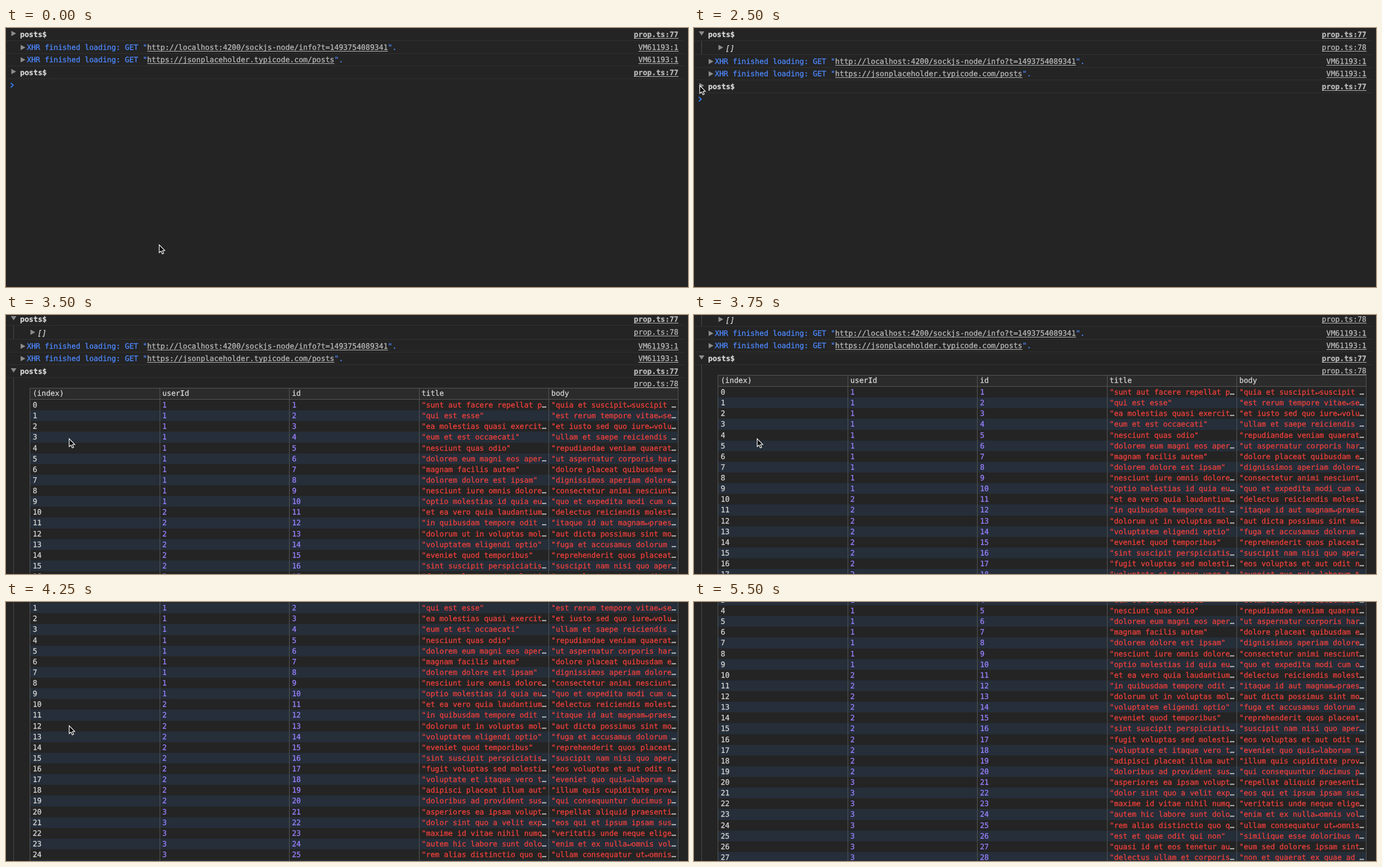
An HTML page with a canvas for the animation above (7500 ms loop, 1212x462 px).

```html
<!DOCTYPE html>
<html lang="en">
<head>
<meta charset="utf-8">
<title>Console</title>
<style>
html, body { margin: 0; width: 100%; height: 100%; overflow: hidden; background: #242424; }
canvas { display: block; }
</style>
</head>
<body>
<canvas id="stage" width="1212" height="462"></canvas>
<script>
const W = 1212, H = 462, LOOP = 7500, STEP = 250;
const ctx = document.getElementById('stage').getContext('2d');

const FONT = '13.17px "DejaVu Sans Mono", monospace';
const BG = '#242424', TEXT = '#d5d5d5', LINK = '#bababa', BLUE = '#4d88ff',
  RED = '#f0403c', PURPLE = '#9980ff', GREY = '#8c8c8c', RULE = '#303030',
  LINE = '#565656', STRIPE = '#252e39', HEAD = '#2b2b2b';

const LEFT = 42.4, COL = 230.4, RIGHT = 1195, TOP = 134, FIRST = 155, ROW = 19.13;
const FIT = 28; // characters that fit in one cell

const ROWS = `sunt aut facere repellat provident|quia et suscipit↵suscipit recusandae
qui est esse|est rerum tempore vitae↵sequi sint
ea molestias quasi exercitationem|et iusto sed quo iure↵voluptatem
eum et est occaecati|ullam et saepe reiciendis voluptatem
nesciunt quas odio|repudiandae veniam quaerat sunt
dolorem eum magni eos aperiam|ut aspernatur corporis harum
magnam facilis autem|dolore placeat quibusdam ea quo
dolorem dolore est ipsam|dignissimos aperiam dolorem qui
nesciunt iure omnis dolorem|consectetur animi nesciunt iure
optio molestias id quia eum|quo et expedita modi cum officia
et ea vero quia laudantium autem|delectus reiciendis molestiae
in quibusdam tempore odit est|itaque id aut magnam↵praesentium
dolorum ut in voluptas mollitia|aut dicta possimus sint mollitia
voluptatem eligendi optio|fuga et accusamus dolorum perferendis
eveniet quod temporibus|reprehenderit quos placeat↵velit
sint suscipit perspiciatis velit|suscipit nam nisi quo aperiam
fugit voluptas sed molestias|eos voluptas et aut odit natus
voluptate et itaque vero tempora|eveniet quo quis↵laborum totam
adipisci placeat illum aut|illum quis cupiditate provident
doloribus ad provident suscipit|qui consequuntur ducimus possimus
asperiores ea ipsam voluptatibus|repellat aliquid praesentium
dolor sint quo a velit explicabo|eos qui et ipsum ipsam suscipit
maxime id vitae nihil numquam|veritatis unde neque eligendi
autem hic labore sunt dolores|enim et ex nulla↵omnis voluptas
rem alias distinctio quo quis|ullam consequatur ut↵omnis quis
est et quae odit qui non|similique esse doloribus nihil
quasi id et eos tenetur aut|eum sed dolores ipsam sint possimus
delectus ullam et corporis nulla|non et quaerat ex quae ad maiores`
  .split('\n').map(line => line.split('|'));

// Pointer stops: [start ms, x, y]
const POINTER = [
  [0, 272, 386], [250, 191, 346], [500, 68, 148], [750, 15, 91], [1000, 11, 15],
  [1250, 10, 14], [1750, 10, 75], [2000, 10, 95], [2250, 10, 102],
  [3000, 20, 111], [3250, 112, 220], [4750, 626, 59], [5000, -50, -50]
];
const SCROLL = [[0, 0], [3500, 4], [3750, 27], [4000, 98], [4250, 173], [4500, 225.5]];

const at = (stops, t) => stops.filter(s => s[0] <= t).pop();

let scroll = 0;

function rect(x, y, w, h, color) {
  const top = Math.round(y - scroll);
  ctx.fillStyle = color;
  ctx.fillRect(Math.round(x), top, w, Math.round(y + h - scroll) - top);
}

// A hairline outline gives the text its slightly heavy smoothing.
function text(str, x, y, color, style = '') {
  ctx.font = style + ' ' + FONT;
  ctx.fillStyle = ctx.strokeStyle = color;
  ctx.lineWidth = 0.3;
  ctx.fillText(str, x, y - scroll);
  ctx.strokeText(str, x, y - scroll);
  return x + ctx.measureText(str).width;
}

function link(str, x, y, style) {
  const end = text(str, x, y, LINK, style);
  rect(x, y + 2, end - x, 1, LINK);
  return end;
}

function source(str, y, style = '') {
  ctx.font = style + ' ' + FONT;
  link(str, RIGHT - ctx.measureText(str).width, y, style);
}

function shape(points, x, y) {
  ctx.beginPath();
  points.forEach(([px, py]) => ctx.lineTo(x + px, y + py));
  ctx.closePath();
}

function arrow(x, y, open) {
  shape(open ? [[-1, 1], [9, 1], [4, 8.5]] : [[0, 0], [8.5, 4.7], [0, 9.4]], x, y - scroll);
  ctx.fillStyle = GREY;
  ctx.fill();
}

const rule = y => rect(0, y, 1206, 1, RULE);

function group(y, open) {
  arrow(9.5, y + 5, open);
  text('posts$', 25, y + 16, TEXT, 'bold');
  source('prop.ts:77', y + 16, 'bold');
  rule(y + 22);
}

function request(url, y) {
  arrow(26, y + 7, false);
  let x = text('XHR finished loading: GET "', 37, y + 16, BLUE);
  x = link(url, x, y + 16);
  text('".', x, y + 16, BLUE);
  source('VM61193:1', y + 16);
  rule(y + 22);
}

function prompt(y) {
  ctx.strokeStyle = '#367cf1';
  ctx.lineWidth = 1.8;
  ctx.beginPath();
  ctx.moveTo(8.5, y + 8 - scroll);
  ctx.lineTo(12.8, y + 12 - scroll);
  ctx.lineTo(8.5, y + 16 - scroll);
  ctx.stroke();
}

function cell(str, x, y) {
  const full = '"' + str + '"';
  if (full.length <= FIT) return text(full, x, y, RED);
  text('…', text(full.slice(0, FIT - 1), x, y, RED), y, TEXT);
}

function table() {
  const width = RIGHT - Math.round(LEFT);
  const inset = i => LEFT + i * COL + 5;
  rect(LEFT, TOP, width, FIRST - TOP, HEAD);
  ['(index)', 'userId', 'id', 'title', 'body'].forEach((name, i) =>
    text(name, inset(i), 148, TEXT));
  ROWS.forEach(([title, body], i) => {
    const y = FIRST + i * ROW, base = y + 14;
    if (i % 2) rect(LEFT, y, width, ROW, STRIPE);
    text(i, inset(0), base, TEXT);
    text(Math.floor(i / 10) + 1, inset(1), base, PURPLE);
    text(i + 1, inset(2), base, PURPLE);
    cell(title, inset(3), base);
    cell(body, inset(4), base);
  });
  rect(LEFT, TOP, width, 1, LINE);
  rect(LEFT, FIRST - 1, width, 1, LINE);
  for (let i = 0; i <= 5; i++) rect(LEFT + i * COL, TOP, 1, 600, LINE);
}

function pointer(x, y) {
  shape([[0.3, 0.8], [0.3, 14.8], [3.5, 12], [5.8, 17], [8.2, 16], [6, 11.2], [10.2, 10.9]], x, y);
  ctx.fillStyle = '#000';
  ctx.fill();
  ctx.strokeStyle = '#fff';
  ctx.lineWidth = 1.2;
  ctx.stroke();
}

function draw(t) {
  scroll = at(SCROLL, t)[1];
  const listOpen = t >= 1500, tableOpen = t >= 2750;
  ctx.fillStyle = BG;
  ctx.fillRect(0, 0, W, H);
  ctx.textRendering = 'geometricPrecision';

  group(0, listOpen);
  let y = 23;
  if (listOpen) {
    rect(13, y, 1, 24, '#4c4c4c');
    arrow(43.5, y + 7, false);
    text('[]', 56, y + 18, TEXT, 'italic');
    source('prop.ts:78', y + 16);
    rule(y + 24);
    y += 25;
  }
  request('http://localhost:4200/sockjs-node/info?t=1493754089341', y);
  request('https://jsonplaceholder.typicode.com/posts', y + 22);
  group(y + 45, tableOpen);
  if (tableOpen) {
    rect(13, 116, 1, 640, '#4c4c4c');
    source('prop.ts:78', 131);
    table();
  } else {
    prompt(y + 67);
  }
  const [, px, py] = at(POINTER, t);
  pointer(px, py);
}

function tick() {
  const t = performance.now() % LOOP;
  draw(Math.floor(t / STEP) * STEP);
  requestAnimationFrame(tick);
}
tick();
</script>
</body>
</html>
```
